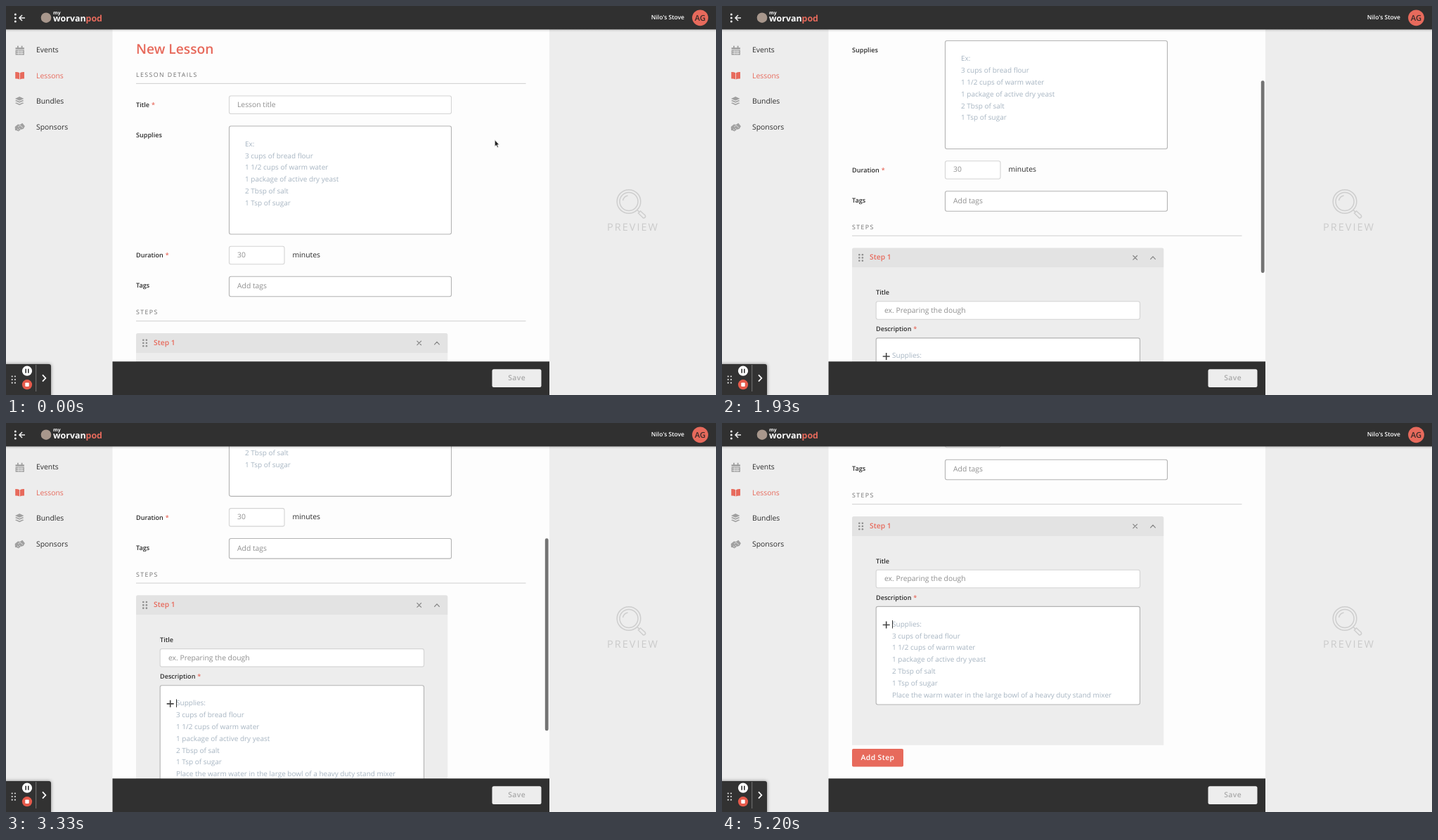
Animation, 1010 px wide and 554 px high, one loop 5330 ms. Source, as an HTML page:

```html
<!DOCTYPE html>
<html lang="en">
<head>
<meta charset="utf-8">
<title>New Lesson</title>
<style>
  html, body { margin: 0; width: 100%; height: 100%; overflow: hidden; background: #ededed; }
  svg { display: block; width: 100vw; height: 100vh; }
  text { font-family: "Open Sans", "Noto Sans", sans-serif; text-rendering: geometricPrecision; white-space: pre; }
  .nav { font-size: 10.4px; fill: #2c2c2c; }
  .label { font-size: 9.1px; font-weight: 600; fill: #2e2e2e; }
  .hint { font-size: 10.35px; fill: #8f8f8f; }
  .list { font-size: 10px; fill: #a7b5c2; }
  .section { font-size: 8.8px; letter-spacing: 1.42px; fill: #707070; }
  .button { font-size: 10.4px; font-weight: 600; letter-spacing: .4px; }
  .red { fill: #e76a5c; }
</style>
</head>
<body>
<svg viewBox="0 0 1010 554" preserveAspectRatio="none">
  <defs>
    <filter id="soft" x="-20%" y="-30%" width="140%" height="160%">
      <feDropShadow dx="0" dy="0" stdDeviation="2.5" flood-opacity=".45"/>
    </filter>
    <linearGradient id="shade" x2="0" y2="1">
      <stop stop-color="#000" stop-opacity=".16"/>
      <stop offset="1" stop-color="#000" stop-opacity="0"/>
    </linearGradient>
  </defs>

  <rect width="1010" height="554" fill="#ededed"/>
  <rect x="151.5" width="621.5" height="554" fill="#fdfdfd"/>
  <g id="page"></g>
  <rect id="thumb" x="766.8" width="4.8" height="274" rx="2.4" fill="#747474"/>

  <!-- preview -->
  <g fill="none" stroke="#cecece" stroke-width="1.5">
    <circle cx="886" cy="278.5" r="16.8"/>
    <circle cx="886" cy="278.5" r="13"/>
    <path d="M877.5 277a9 9 0 0 1 7-7"/>
    <path d="M898 290.5l2.5 2.5M899.5 295l3-3 6.8 6.2a2.4 2.4 0 0 1-3.3 3.3z"/>
  </g>
  <text x="855" y="319.7" font-size="14.5" letter-spacing="2" fill="#cbcbcb">PREVIEW</text>

  <!-- sidebar -->
  <g id="nav"></g>
  <g fill="#a0a0a0">
    <path d="M13.5 59.2h12.4v2.6H13.5zM16 56.7h1.8v3H16zM21.7 56.7h1.8v3h-1.8z"/>
    <path d="M13.5 62.7h12.4v7H13.5z"/>
    <path d="M14.5 65h10.5M14.5 67.5h10.5M17.5 63.3v6M20 63.3v6M22.6 63.3v6" stroke="#ededed" stroke-width=".8"/>
    <path d="M19.2 129l6.3 2.9-6.3 2.9-6.3-2.9z"/>
    <path d="M14.7 134l4.5 2 4.5-2 1.8.9-6.3 2.9-6.3-2.9zM14.7 137.4l4.5 2 4.5-2 1.8.9-6.3 2.9-6.3-2.9z"/>
    <path d="M12.7 172l4.2-3.4 3 .4 3.4-2.3 3.6 4.6-2.2 3.6-3.7 1.2-3.3 2.4-2.5-1.2-2.2-.4z"/>
    <path d="M17 172.2l3-2.2 4 3.3M16 175l2 1.7M18.6 173.8l2 1.7" fill="none" stroke="#ededed" stroke-width=".8"/>
  </g>
  <path class="red" d="M13.2 94q3.6-.3 6 1.2v9.4q-2.4-1.4-6-1.1zM26 94q-3.6-.3-6 1.2v9.4q2.4-1.4 6-1.1z"/>

  <!-- top bar -->
  <rect y="33" width="1010" height="4" fill="url(#shade)"/>
  <rect width="1010" height="33.4" fill="#303030"/>
  <g fill="#eee">
    <circle cx="13.3" cy="12" r="1.5"/><circle cx="13.3" cy="17" r="1.5"/><circle cx="13.3" cy="22" r="1.5"/>
  </g>
  <path d="M27 17h-7.5M23 13l-4 4 4 4" fill="none" stroke="#eee" stroke-width="1.6"/>
  <circle cx="57" cy="16.7" r="7.3" fill="#a8978c"/>
  <text x="67" y="12" font-size="6.8" font-weight="700" fill="#fff">my</text>
  <text x="67" y="21.8" font-size="12.4" font-weight="700" fill="#fff">worvan<tspan class="red">pod</tspan></text>
  <text x="965" y="19" font-size="8.5" font-weight="600" fill="#fff" text-anchor="end">Nilo's Stove</text>
  <circle class="red" cx="987.5" cy="16.8" r="11.4"/>
  <text x="987.5" y="20.9" font-size="11.2" font-weight="600" fill="#3a2b29" text-anchor="middle">AG</text>

  <!-- bottom bar -->
  <rect x="151.5" y="506.3" width="621.5" height="48" fill="#303030"/>
  <rect x="691.5" y="517.3" width="70" height="25.7" rx="2.5" fill="#ededed"/>
  <text class="button" x="726.6" y="533.4" text-anchor="middle" fill="#a9a9a9">Save</text>

  <!-- recorder -->
  <path d="M-8 510h69a3 3 0 0 1 3 3v50h-72z" fill="#303030" filter="url(#soft)"/>
  <g id="grip" fill="#ddd"></g>
  <circle cx="30" cy="519.7" r="7.1" fill="#fff"/>
  <path d="M28.2 516.7v6M31.8 516.7v6" stroke="#303030" stroke-width="1.6"/>
  <circle cx="30" cy="539.2" r="7.1" fill="#e65a4b"/>
  <rect x="27.3" y="536.5" width="5.4" height="5.4" rx=".8" fill="#fff"/>
  <path d="M42.7 511v38" stroke="#777"/>
  <path d="M52 525.4l4.3 4.6-4.3 4.6" fill="none" stroke="#fff" stroke-width="1.8"/>

  <path id="pointer" d="M695.2 190.6v9.6l2.2-1.9 1.5 3.4 1.6-.7-1.5-3.3h2.9z" fill="#222" stroke="#fff" stroke-width=".8"/>
</svg>
<script>
const $ = id => document.getElementById(id);
const text = (x, y, cls, str) => `<text x="${x}" y="${y}" class="${cls}">${str}</text>`;
const field = (x, y, w, h, stroke) =>
  `<rect x="${x}" y="${y}" width="${w}" height="${h}" rx="2.5" fill="#fff" stroke="${stroke}" stroke-width="1.1"/>`;
const label = (x, y, str, starX) =>
  text(x, y, 'label', str) + (starX ? text(starX, y, 'label red', '*') : '');
const list = (x, y, rows) => rows.map((row, i) => text(x, y + i * 16.84, 'list', row)).join('');
const section = (y, str) =>
  text(185, y, 'section', str) + `<path d="M185 ${y + 9.5}H739.5" stroke="#cfcfcf"/>`;
const dots = (x, y, dx, dy, r) => [0, 1, 2, 3, 4, 5].map(i =>
  `<circle cx="${x + i % 2 * dx}" cy="${y + (i >> 1) * dy}" r="${r}"/>`).join('');

const LIGHT = '#d4d4d4', DARK = '#b3b3b3';
const supplies = ['3 cups of bread flour', '1 1/2 cups of warm water',
  '1 package of active dry yeast', '2 Tbsp of salt', '1 Tsp of sugar'];

$('nav').innerHTML = ['Events', 'Lessons', 'Bundles', 'Sponsors'].map((name, i) =>
  text(43, 66 + i * 36.5, i === 1 ? 'nav red' : 'nav', name)).join('');
$('grip').innerHTML = dots(8.7, 527.5, 4.2, 4.6, 1.1);

$('page').innerHTML =
  '<text x="185" y="68.4" class="red" font-size="19.2" font-weight="600">New Lesson</text>' +
  section(100.9, 'LESSON DETAILS') +
  label(185, 144.4, 'Title', 207) +
  field(317.5, 128, 316, 25.5, LIGHT) + text(329, 143.8, 'hint', 'Lesson title') +
  label(185, 187.4, 'Supplies') +
  field(317.5, 171, 316, 154, DARK) + list(340, 199.7, ['Ex:', ...supplies]) +
  label(185, 358.4, 'Duration', 226.8) +
  field(317.5, 342.3, 78.5, 25.5, LIGHT) + text(329, 358, 'hint', '30') +
  text(407.5, 358, 'nav', 'minutes') +
  label(185, 401.4, 'Tags') +
  field(317.5, 385.2, 316, 28.6, DARK) + text(329, 402.4, 'hint', 'Add tags') +
  section(439.2, 'STEPS') +
  // step card
  '<path d="M185 494H628.3V791.7H185z" fill="#ededed"/>' +
  '<path d="M185 494V468.5q0-2.5 2.5-2.5H625.8q2.5 0 2.5 2.5V494z" fill="#e3e3e3"/>' +
  `<g fill="#8d8d8d">${dots(195.3, 475.7, 4.6, 4.3, 1.3)}</g>` +
  '<text x="210" y="482.8" class="red" font-size="10.3" font-weight="600">Step 1</text>' +
  '<path d="M584.5 476.8l6.4 6.4m0-6.4l-6.4 6.4M609.3 482.4l3.7-4 3.7 4" fill="none" stroke="#858585" stroke-width="1.2"/>' +
  label(219, 532.8, 'Title') +
  field(219.2, 542.3, 375.3, 25.5, LIGHT) + text(231, 558.2, 'hint', 'ex. Preparing the dough') +
  label(219, 584.8, 'Description', 272.2) +
  field(219.2, 594.4, 375.3, 139.6, DARK) +
  list(242, 622.8, ['Supplies:', ...supplies,
    'Place the warm water in the large bowl of a heavy duty stand mixer']) +
  '<path d="M228.7 620.5h10m-5-5v10" stroke="#444" stroke-width="1.6"/>' +
  '<path id="caret" d="M242.5 614v11.5" stroke="#333"/>' +
  '<rect x="185" y="797" width="73" height="25.5" rx="2" class="red"/>' +
  '<text x="221.5" y="813.2" class="button" text-anchor="middle" fill="#fff">Add Step</text>';

// time and scroll offset
const path = [[800, 0], [1000, 20.4], [1933, 121.5], [2267, 128], [2350, 128],
  [2600, 153], [3333, 220.6], [3867, 318.8], [4067, 332.4], [4333, 333]];

const slope = i => (path[i + 1][1] - path[i][1]) / (path[i + 1][0] - path[i][0]);
function tangent(i) {
  if (!i || i === path.length - 1) return 0;
  const a = slope(i - 1), b = slope(i);
  return a * b > 0 ? 2 * a * b / (a + b) : 0;
}
function scrollAt(t) {
  if (t <= path[0][0]) return 0;
  const i = path.findIndex(p => p[0] >= t) - 1;
  if (i < 0) return path[path.length - 1][1];
  const [t0, y0] = path[i], [t1, y1] = path[i + 1];
  const d = t1 - t0, u = (t - t0) / d, v = 1 - u;
  return y0 * (1 + 2 * u) * v * v + y1 * u * u * (3 - 2 * u) +
    d * u * v * (tangent(i) * v - tangent(i + 1) * u);
}

const LOOP = 5330, TICK = 1000 / 15, BLINK = 1064;

function draw(now) {
  const t = Math.floor((now % LOOP + 7) / TICK) * TICK;
  const y = scrollAt(t);
  $('page').setAttribute('transform', `translate(0 ${-y.toFixed(2)})`);
  $('thumb').setAttribute('y', 35 + y * 0.586);
  $('thumb').setAttribute('opacity', t < 850 ? 0 : Math.max(0, Math.min(1, (4860 - t) / 300)));
  const phase = ((t - 1937) % BLINK + BLINK) % BLINK;
  $('caret').setAttribute('opacity', phase < BLINK / 2 ? 1 : 0);
  $('pointer').setAttribute('opacity', t < 1400 ? 1 : 0);
}

const start = performance.now();
function loop() {
  draw(performance.now() - start);
  requestAnimationFrame(loop);
}
loop();
</script>
</body>
</html>
```
